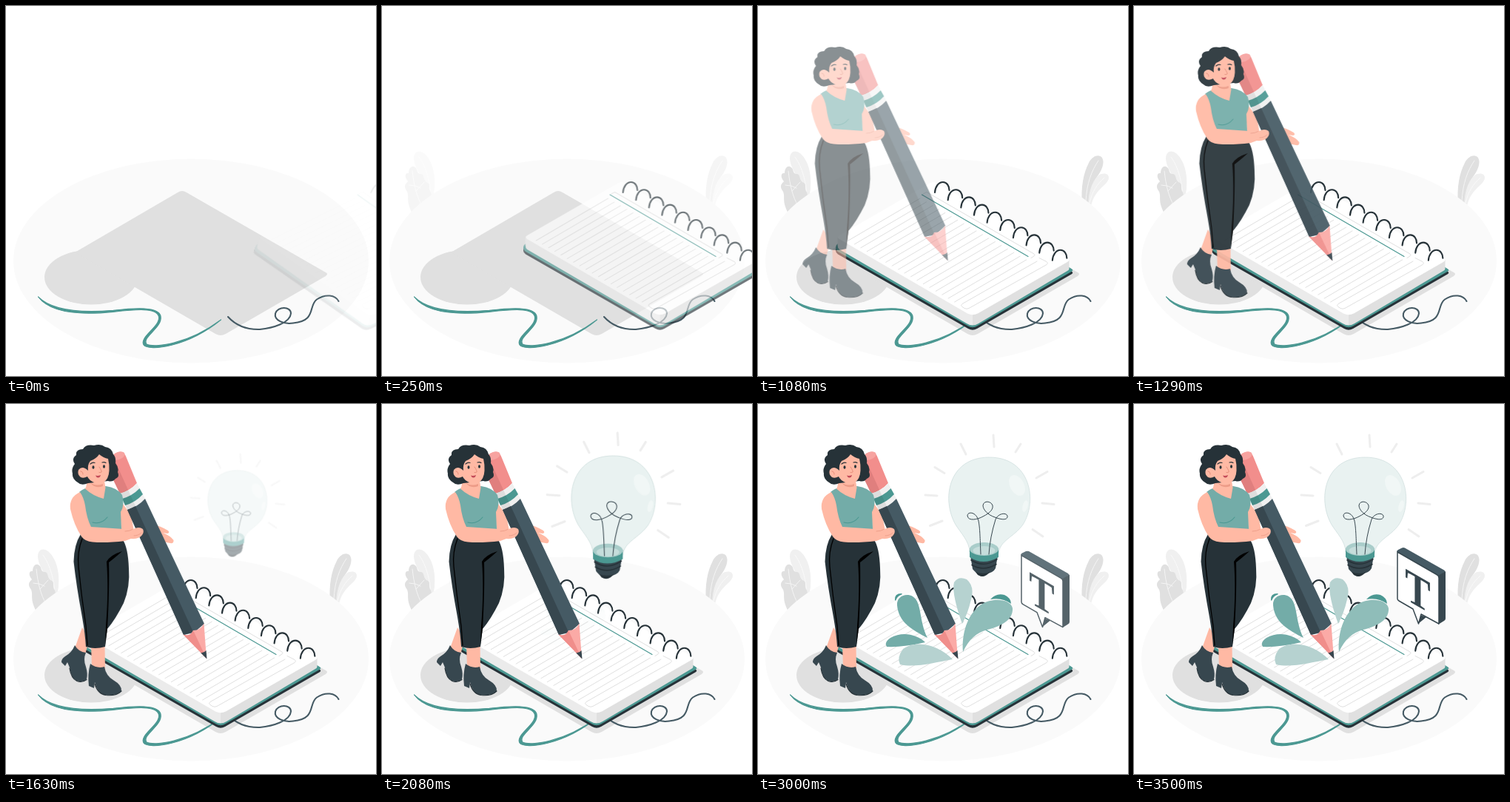
Recreate the animation shown at these times as an HTML page. Size 500 by 500 pixels, loop 3.54 s.

```html
<!DOCTYPE html>
<html lang="en">
<head>
<meta charset="utf-8">
<title>Creative writing</title>
<style>
  html, body { margin: 0; width: 100%; height: 100%; overflow: hidden; background: #fff; }
  svg { display: block; width: 100vw; height: 100vh; }
  .dark { fill: #263238; }
  .slate { fill: #37474f; }
  .teal { fill: #4b9892; }
  .mid { fill: #73aca8; }
  .pale { fill: #b6d2d0; }
  .skin { fill: #ffb9a4; }
  .g1 { fill: #e0e0e0; }
  .g2 { fill: #f0f0f0; }
  .line { fill: none; stroke-linecap: round; stroke-linejoin: round; }
</style>
</head>
<body>
<svg viewBox="0 0 500 500">
  <g id="plants">
    <path class="g2" d="M66 268C56 252 58 240 50 226C43 214 40 202 47 197C58 193 70 212 71 232C72 246 70 258 66 268Z"/>
    <path class="line" stroke="#fafafa" d="M66 262C66 240 60 217 50 204"/>
    <path class="g1" d="M41 280C32 264 37 259 34 251C28 243 32 240 35 237C29 230 32 225 36 226C36 219 40 216 43 217C49 219 46 225 51 227C58 226 55 234 60 238C67 240 62 246 65 250C69 256 66 262 58 270Z"/>
    <path class="line" stroke="#f5f5f5" d="M41 223C43 242 47 258 54 270M37 242Q45 242 52 246M46 250L57 238"/>
    <path class="g1" d="M438 268C436 245 440 225 447 212C452 202 461 200 465 205C469 212 465 222 456 234C450 243 448 255 446 275Z"/>
    <path class="line" stroke="#f5f5f5" d="M443 264C444 240 451 222 460 209"/>
    <path class="g2" d="M446 276C446 255 450 238 460 229C466 225 474 226 474 232C474 238 466 243 460 250C455 256 451 262 449 276Z"/>
    <path class="line" stroke="#fafafa" d="M448 266C452 250 458 241 468 232"/>
  </g>

  <ellipse cx="250" cy="344.5" rx="240" ry="138" fill="#fafafa"/>
  <ellipse class="g1" cx="115" cy="366.5" rx="63" ry="37"/>
  <path class="g1" d="M232 252Q238 248 244 252L432 360Q436 362 432 365L297 443Q290 447 283 443L93 333Z"/>
  <path class="teal" stroke="#4b9892" stroke-width="1.2" stroke-linejoin="round" d="M43.500 393C60 415 100 418 145 413.300C175 410 204 407 206.500 420C209 433 180 447 186 458C193 467 245 461 290.500 424C245 458 200 462 190 457C183 447 212 435 209 419C206 406 175 408 145 411.300C100 415 62 412 43.500 393Z"/>
  <path class="line" stroke="#455a64" stroke-width="2.1" d="M300 420C310 431 325 437.500 343 437C360 435.500 384 428.500 385 415.500C385 405.500 367 405.500 364 415.500C362 424.500 375 430.500 388 428.500C420 425.500 408 405.500 420 396.500C432 388.500 445 390.500 449.500 399"/>

  <g id="book">
    <g id="cover"></g>
    <path fill="#ebebeb" d="M107.500 313L290 414V431.500Q286 431.500 282 429L110 329Q107.500 327 107.500 323Z"/>
    <path class="g1" d="M290 414L420.500 343V355Q420.500 357 418 358L298 429Q294 431.500 290 431.500Z"/>
    <path fill="#fff" d="M232 239.500Q237 236.500 242 239.500L418 341Q422.500 343.500 418 346L297 415.500Q290 419 283 415.500L110 315Q106 312.500 110 310Z"/>
    <g class="line" stroke="#e0e0e0" id="rules">
      <path d="M223 254L228 251.500L373 335Q375 336.500 373 338L369 340.500"/>
      <path d="M380 340.500L390 345.500Q393 347.500 390 349.500L285 408.500Q282 410 279 408.500L276 406.500Q273 404.500 276 402.500L377 345"/>
    </g>
    <path class="line" stroke="#4b9892" stroke-width="1.200" d="M221.500 255L365 338.500"/>
    <g class="line" stroke="#263238" stroke-width="2.100" id="rings"></g>
  </g>

  <g id="bulb">
    <path class="line" stroke="#eee" stroke-width="3" d="M318 42L319 58M348 65L355 54M376 100L391 91.500M384 134L400 135.500M371 169.500L385 179M232.500 164.500L249 158M226 123L242 124M239 85.500L252 93.500M274 54L281 68"/>
    <path fill="#e9f2f1" stroke="#ccdcdb" stroke-width=".7" d="M286 200C286 186 273 173 267 163C248 130 256 72 312.500 72C369 72 378 132 358 163C346 180 327 184 325 202Z"/>
    <g fill="#f1f7f6">
      <ellipse cx="350" cy="110" rx="9.500" ry="15" transform="rotate(-28 350 110)"/>
      <ellipse cx="361" cy="138" rx="3.500" ry="8" transform="rotate(14 361 138)"/>
    </g>
    <path class="slate" d="M287 205L290 223Q294 228 297 229Q303 237 309 229Q318 228 321 222L324 205Z"/>
    <path class="dark" d="M294 227Q304 231 314 227L309 231Q303.500 235 297 231Z"/>
    <path class="line" stroke="#263238" stroke-width="1.500" d="M288 211Q305 222 323 210M289 217.500Q305 227 322 216.500"/>
    <path class="teal" d="M286 195V207Q304 219 325 207V195Z"/>
    <ellipse cx="305.500" cy="196" rx="19.500" ry="9" fill="#a9cdca"/>
    <ellipse cx="305.500" cy="198" rx="15" ry="6" fill="#c5dddb"/>
    <path class="line" stroke="#37474f" d="M301 203C300 180 300 168 298 158C295 145 283 145 283 151C284 159 297 156 304 152C314 147 318 142 317 137C315 131 305 130 304 137C304 143 311 150 320 153C330 157 338 157 337 151C335 146 324 148 321 156C316 172 313 188 312 203"/>
  </g>

  <g id="splash">
    <path class="mid" d="M229 316C208 305 190 295 188 272C187 260 200 255 209 260C222 268 217 292 229 316Z"/>
    <path class="teal" d="M185 265Q184 256 194 256Q196 257 193 258Q188 260 186 266Z"/>
    <path class="mid" d="M226 322C214 311 195 307 179 316Q170 322 174 328Q196 329 226 322Z"/>
    <path class="pale" d="M263 345C246 327 215 317 196 331Q187 343 192 352C212 357 240 349 263 345Z"/>
    <path class="pale" d="M276 297C268 275 262 252 265 241Q271 232 282 237Q293 246 288 264Q284 282 276 297Z"/>
    <path fill="#8fbdb9" d="M277 335C275 310 283 285 300 272C316 261 341 263 344 276C345 291 330 300 310 305C295 309 285 318 277 335Z"/>
    <path class="teal" d="M314 264Q322 255 333 258Q342 262 342 270Q330 261 314 264Z"/>
  </g>

  <g id="sign">
    <path fill="#455a64" d="M355 199.500Q355 198 357 197L362 194.500Q364 193.500 366 194.500L419 224.500Q421 226 420 227L412 233Z"/>
    <path class="slate" d="M411 232L421 226V290Q421 292 419 293L411 298ZM384 297L387 285L395 288Z"/>
    <path fill="#fff" stroke="#37474f" stroke-width="1.500" stroke-linejoin="round" d="M356 200L409 230.500Q412 232 412 235V297L388 284L384.500 297L377 277L358 266Q356 265 356 263Z"/>
    <text class="slate" transform="matrix(.82 .473 0 1 383.5 273.500)" text-anchor="middle" font-family="'Liberation Serif', 'Times New Roman', serif" font-weight="700" font-size="63">T</text>
  </g>

  <g id="writer">
    <!-- far arm -->
    <path class="skin" d="M152 128L168 150L172 172L155 172ZM196 162Q208 165 218 171Q221 174 217 175L211 174Q221 178 225.500 184Q226 189 221 188L205 185Z"/>

    <!-- pencil -->
    <g transform="translate(-1 0)">
      <path fill="#f28e8c" d="M140 92L144 72Q149 63 157 65Q161 67 163 73L177 107Q168 117 154 121Z"/>
      <path fill="#e07f7e" d="M140 92L145 72L165 116Q160 119 154 121Z"/>
      <ellipse cx="152" cy="70" rx="9" ry="5" fill="#f7a3a0" transform="rotate(-20 152 70)"/>
      <path class="g2" d="M154 121Q168 117 177 107L188 128Q178 139 164 143Z"/>
      <path class="teal" d="M157 128Q171 124 180.500 114L185 122Q175 133 161 137Z"/>
      <path fill="#000" opacity=".08" d="M154 121L165 116L175 138L164 143Z"/>
      <path fill="#455a64" d="M164 143Q178 139 188 128L268 297L254 309L240 312Z"/>
      <path class="slate" d="M164 143L175 138L253 308L240 312Z"/>
      <path fill="#fbaaa6" d="M239.500 311.500Q249 315 253 306Q263 306 267.500 296.500L271 344Z"/>
      <path fill="#f08e8b" d="M239.500 311.500Q249 315 253 306L271 344Z"/>
      <path class="slate" d="M263 336Q267 337 270.500 333L271.500 344.500Z"/>
    </g>

    <!-- legs -->
    <path class="skin" d="M102 302L112 318L106 338L92 330ZM114 324H132.500L133 358L115 357Z"/>
    <path class="slate" d="M92 326Q97 335 107 336Q103 345 107 355Q110 365 108 372Q102 377 94 374Q87 370 85 356L82 349L79 354L74 349Q74 344 79 341Q88 336 92 326Z"/>
    <path class="slate" d="M113 351Q122 358 132 355Q134 367 144 373Q156 380 155 388Q148 395 132 393Q123 391 119 376L118 384L111 381Q109 365 113 351Z"/>
    <path class="line" stroke="#263238" stroke-width="1.200" d="M85 357Q87 371 95 374.500Q102 377 108 372.500M119 378Q123 392 134 393.500Q148 395 155 388"/>
    <path class="dark" d="M100 176L156 182Q164 193 165 222Q167 247 158 269Q147 291 136 304L133 328Q119 332 107 328Q106 311 102 288Q94 245 90.500 213Q91 190 100 176Z"/>
    <path d="M156 199Q140 204 135 213Q138 250 134 300L133 326L136 303Q139 250 138 214Q146 208 156 199Z"/>
    <path class="line" stroke="#000" stroke-width="1.300" d="M102 182Q95 200 97 220Q101 260 107 300L109 326"/>

    <!-- torso -->
    <path class="mid" d="M98 119Q104 114 110 113L134 111Q149 113 156 123Q160 136 154 146L155 168L157 180L104 178Q108 155 104 138Z"/>
    <path class="skin" d="M108 98L132 104L133.500 113L131 128Q116 124 106 114.500Q109 110 108 98Z"/>
    <path fill="#ed9c88" d="M113 106Q120 112 130 108L130 111Q119 115 113 106Z"/>
    <path class="line" stroke="#4b9892" stroke-width="1.100" d="M116 160Q128 163 136 153"/>

    <!-- head -->
    <path class="dark" d="M92 81Q87 74 94 69Q93 61 103 61Q107 54 118 56Q127 53 133 58Q142 59 144 68Q148 72 147 80Q152 86 150 92Q153 99 147 101Q143 106 137 104L110 107Q101 111 96 106Q88 101 89 94Q87 87 92 81Z"/>
    <path class="skin" d="M110 90Q109 82 113 77Q121 74 125 68Q131 73 137 74Q139 82 138.500 90Q138 101 131 106Q126 108.500 119 106.500Q111 103 109 98Q104 101 100 99Q95 95 97 89Q101 84 106 87Q108 88 110 90Z"/>
    <ellipse class="dark" cx="117" cy="85.500" rx="1.500" ry="2.200"/>
    <ellipse class="dark" cx="131.500" cy="84.500" rx="1.500" ry="2.200"/>
    <path class="line" stroke="#263238" stroke-width="1.200" d="M113 81Q116 78.500 119 79.500M129 79Q132 78 134 79.500"/>
    <path class="line" stroke="#e58d79" d="M125 85Q129 91 128 92Q127 93 125 92.500M100 91Q103 91 103 95"/>
    <path fill="#c34b58" d="M120 96.500Q123 97.500 127 96Q126 100 123 99.500Q121 99 120 96.500Z"/>

    <!-- near arm -->
    <path class="skin" d="M99 119Q104 126 106 137Q108 154 114 166L158 169Q166 168 171 169Q179 165 184 169Q186 173 183 177Q179 183 168 182L160 185Q134 188 116 186.500Q106 186 101 179Q91 164 86 142Q84 126 99 119Z"/>
    <path class="line" stroke="#ed9c88" stroke-width=".9" d="M160 172Q166 172 170 169.500M172 178Q178 178 182 174"/>
  </g>
</svg>

<script>
  const LOOP = 3540, LEAD = 33;
  const $ = id => document.getElementById(id);

  const add = (parent, d, attrs = {}) => {
    const path = document.createElementNS('http://www.w3.org/2000/svg', 'path');
    path.setAttribute('d', d);
    for (const key in attrs) path.setAttribute(key, attrs[key]);
    parent.append(path);
  };

  // Two cover boards, the lower one a little further down.
  const board = 'M108 321Q105 323 105 327Q105 330 108 332L284 432.500Q290 436 296 432.500L423.500 359Q427 357 423.500 355L400 340Z';
  add($('cover'), board, { class: 'dark', transform: 'translate(0 3.500)' });
  add($('cover'), board, { class: 'teal' });

  for (let i = 0; i < 18; i++)
    add($('rules'), `M${122 + 8.45 * i} ${317 + 4.88 * i}l97 -57`);
  for (let i = 0; i < 10; i++)
    add($('rings'), `M${239 + 17.65 * i} ${252 + 10.2 * i}c.5 -8 5 -14 11 -14c5 0 8.500 5 8.500 11`);

  const bounce = 'cubic-bezier(.36, -.01, .5, 1.38)';
  const enter = from => [{ opacity: 0, transform: from }, { opacity: 1, transform: 'none' }];
  const lean = (x, deg) => `translateX(${x}px) skewX(${deg}deg)`;
  const dash = [
    { offset: 0, opacity: 0, transform: lean(250, -20) },
    { offset: .6, opacity: 1, transform: lean(0, 10) },
    { offset: .8, opacity: 1, transform: lean(0, -2) },
    { offset: 1, opacity: 1, transform: lean(0, 0) }
  ].map(step => ({ ...step, easing: 'ease-out' }));

  // id, delay, easing, origin, keyframes
  const parts = [
    ['plants', 0, bounce, '0 0', [{ opacity: 0 }, { opacity: 1 }]],
    ['book', 0, 'linear', '0 341px', dash],
    ['writer', 711, bounce, '0 0', enter('translateX(-30px)')],
    ['bulb', 1303, bounce, '313px 136.5px', enter('scale(.5)')],
    ['splash', 2024, bounce, '258px 295px', enter('scale(.5)')],
    ['sign', 2475, bounce, '0 0', enter('translateY(30px)')]
  ].map(([id, delay, easing, origin, steps]) => {
    $(id).style.transformOrigin = origin;
    const anim = $(id).animate(steps, { duration: 1000, delay, easing, fill: 'both' });
    anim.pause();
    return anim;
  });

  const start = performance.now();
  function draw() {
    const time = (performance.now() - start) % LOOP + LEAD;
    for (const anim of parts) anim.currentTime = time;
    requestAnimationFrame(draw);
  }
  draw();
</script>
</body>
</html>
```
